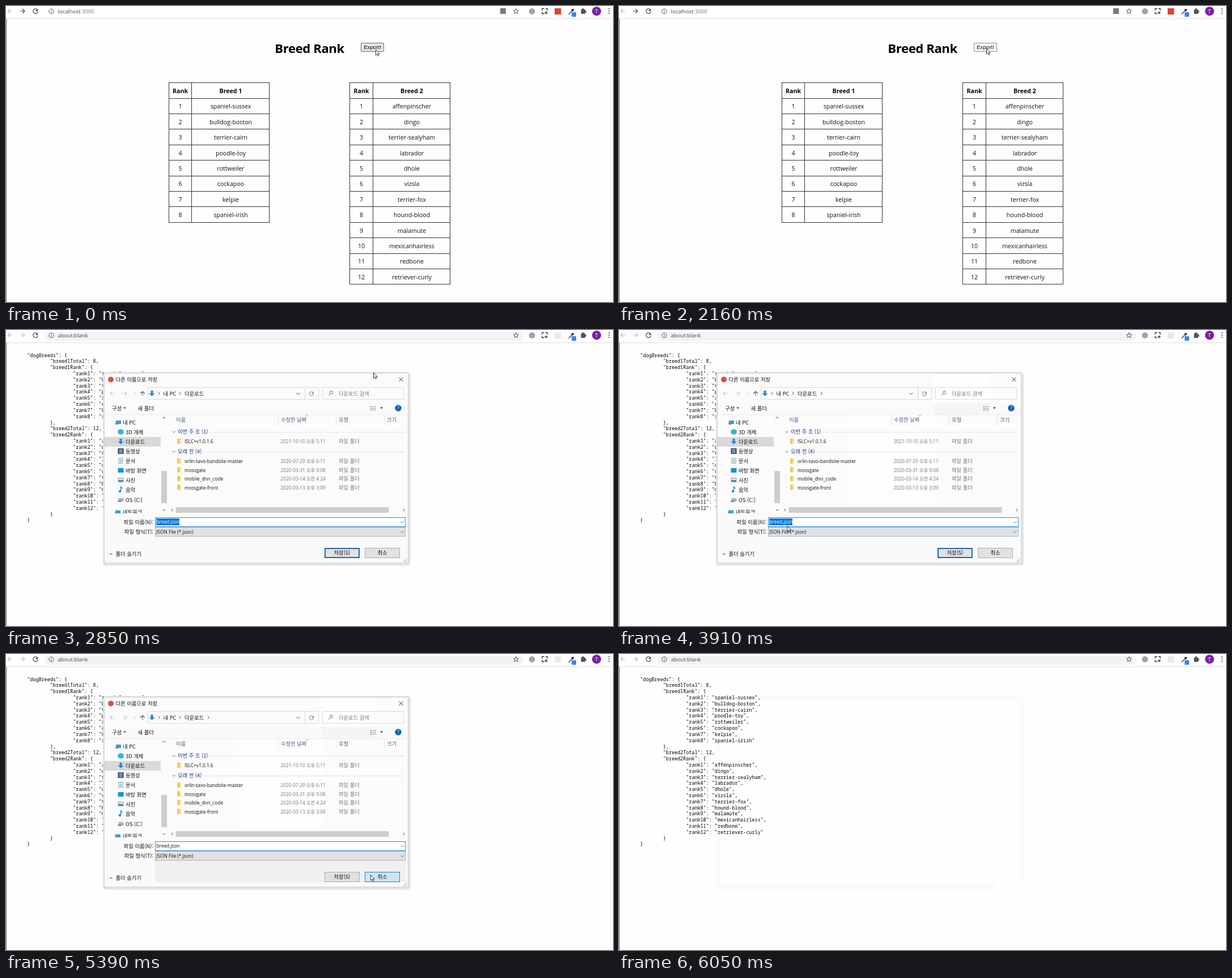
Animation, 1071 px wide and 523 px high, one loop 6.33 s. Source, as an HTML page:

```html
<!DOCTYPE html>
<html lang="ko">
<head>
<meta charset="utf-8">
<title>Breed Rank</title>
<style>
  html, body { margin: 0; width: 100%; height: 100%; overflow: hidden; background: #fefefe; }
  svg { display: block; width: 1071px; height: 523px; }
  text { font: 10.62px "Open Sans", "Noto Sans", sans-serif; fill: #111; white-space: pre; }
  .mid { text-anchor: middle; }
  .end { text-anchor: end; }
  .bold { font-weight: 700; fill: #000; }
  text.title { font-size: 22.2px; letter-spacing: -.45px; }
  text.url { font-size: 9.5px; fill: #444; }
  text.button { font: 9.7px "Liberation Sans", Arial, sans-serif; fill: #111; }
  text.code { font: 8.43px "Noto Sans Mono", "DejaVu Sans Mono", monospace; fill: #000; }
  text.ko { font: 9.3px "Noto Sans CJK KR", "Noto Sans CJK JP", sans-serif; }
  text.file { font: 8.3px "Open Sans", "Noto Sans CJK KR", "Noto Sans CJK JP", sans-serif; }
  text.soft { fill: #777; }
  text.head { fill: #4c607a; }
  text.group { fill: #1e3287; }
  text.white { fill: #fff; }
</style>
</head>
<body>
<svg id="stage" viewBox="0 0 1071 523" xmlns="http://www.w3.org/2000/svg"></svg>
<script>
const LOOP = 6330;
const stage = document.getElementById('stage');

// Drawing helpers
const text = (x, y, value, cls = '') => `<text x="${x}" y="${y}" class="${cls}">${value}</text>`;
const rect = (x, y, w, h, fill, extra = '') =>
  `<rect x="${x}" y="${y}" width="${w}" height="${h}" fill="${fill}" ${extra}/>`;
const box = (x, y, w, h, fill, stroke, extra = '') =>
  rect(x + .5, y + .5, w - 1, h - 1, fill, `stroke="${stroke}" ${extra}`);
const line = (d, color = '#444', width = 1) =>
  `<path d="${d}" fill="none" stroke="${color}" stroke-width="${width}"/>`;
const shape = (d, fill) => `<path d="${d}" fill="${fill}"/>`;
const dot = (x, y, r, fill) => `<circle cx="${x}" cy="${y}" r="${r}" fill="${fill}"/>`;
const chevron = (x, y, dir, color = '#444', s = 2.6) => line({
  down: `M${x - s} ${y - s / 2}l${s} ${s} ${s} ${-s}`,
  up: `M${x - s} ${y + s / 2}l${s} ${-s} ${s} ${s}`,
  left: `M${x + s / 2} ${y - s}l${-s} ${s} ${s} ${s}`,
  right: `M${x - s / 2} ${y - s}l${s} ${s} ${-s} ${s}`,
}[dir], color);
const arrow = (x, y, dir, color, s = 4) =>
  `<g transform="translate(${x} ${y}) rotate(${dir})">${line(`M${-s} 0H${s}M0 ${-s}L${s} 0L0 ${s}`, color, 1.1)}</g>`;
const reload = (x, y, r, color = '#444', width = 1.2) =>
  line(`M${x + r * .75} ${y - r * .65}A${r} ${r} 0 1 0 ${x + r} ${y + r * .2}`, color, width) +
  shape(`M${x + r} ${y - r}v${r}h${-r}z`, color);
// "on" lists the spans in ms in which a group is visible
const during = (on, content, extra = '') => `<g data-on="${on}" ${extra}>${content}</g>`;

const breeds1 = 'spaniel-sussex bulldog-boston terrier-cairn poodle-toy rottweiler cockapoo kelpie spaniel-irish'.split(' ');
const breeds2 = ('affenpinscher dingo terrier-sealyham labrador dhole vizsla terrier-fox hound-blood ' +
  'malamute mexicanhairless redbone retriever-curly').split(' ');

const browserBar = () => {
  const star = Array.from({ length: 10 }, (_, i) => {
    const r = i % 2 ? 2.1 : 4.8, a = Math.PI * (i / 5 - .5);
    return `${(900 + r * Math.cos(a)).toFixed(1)} ${(9.5 + r * Math.sin(a)).toFixed(1)}`;
  }).join('L');
  return rect(0, 0, 1071, 22, '#fff') +
    during('2310-6330', rect(68, 3, 845, 16, '#f1f3f4', 'rx="8"')) +
    rect(0, 22, 1071, 1, '#dfe0e2') + rect(0, 22, 1, 501, '#6a6a6a') +
    arrow(7, 9, 180, '#bbb') +
    during('0-2310', arrow(29, 9, 0, '#444')) + during('2310-6330', arrow(29, 9, 0, '#bbb')) +
    reload(52, 9, 4.2) +
    `<circle cx="80" cy="9.5" r="4.2" fill="none" stroke="#555"/>` + rect(79.5, 9, 1, 3, '#555') + rect(79.5, 7, 1, 1, '#555') +
    during('0-2310', text(91.5, 13, 'localhost<tspan fill="#777">:3000</tspan>', 'url') +
      rect(872, 4, 10, 10, '#777b80') + rect(968, 4, 11.5, 11, '#cf4a35')) +
    during('2310-6330', text(91.5, 13, 'about:blank', 'url') + rect(968, 4, 11.5, 11, '#e9e9e9')) +
    line(`M${star}Z`, '#555') + dot(928, 9.5, 5.4, '#a3a3a3') +
    line('M946 8V4.500H949.500M952 4.500H955V8M946 10.500V13.500H949.500', '#333', 1.3) +
    line('M953 9.500v5M950.500 12h5', '#333', 1.3) +
    line('M993 14.500L999 8', '#555', 1.8) + line('M998 6l3 3M999.500 7.500l2-2', '#222', 2.2) +
    rect(998, 11, 8, 8, '#3f83ee', 'rx="1"') +
    rect(1014.5, 6, 7.5, 8, '#555', 'rx="1"') + dot(1018, 5.6, 1.7, '#555') + dot(1022.4, 10, 1.7, '#555') +
    dot(1042, 9.2, 8, '#7b1fa2') + text(1042, 12.5, 'T', 'url mid white') +
    [5, 9, 13].map(y => dot(1064, y, 1.1, '#444')).join('');
};

const rankTable = (x, split, width, name, breeds) => {
  const rows = ['Rank', ...breeds], pitch = 27.4;
  const rowTop = i => Math.floor(135.7 + pitch * i);
  const bottom = rowTop(rows.length);
  return box(x, 135, width, bottom - 134, '#fefefe', '#333') +
    line(`M${split + .5} 135V${bottom}`, '#333') +
    rows.map((breed, i) => {
      const y = 154 + pitch * i, cls = i ? 'mid' : 'mid bold';
      return (i ? line(`M${x} ${rowTop(i) + .5}H${x + width}`, '#333') : '') +
        text((x + split) / 2 + .5, y, i || breed, cls) +
        text((split + x + width) / 2 + .5, y, i ? breed : name, cls);
    }).join('');
};

const exportButton = () => {
  const face = (fill, border) => box(626, 65, 41, 16, fill, border, 'rx="1.5"');
  return during('250-550,1120-1540', face('#efefef', '#767676')) +
    during('0-250,550-1120,1540-2160', face('#e5e5e5', '#6a6a6a')) +
    during('2160-2310', face('#f5f5f5', '#8d8d8d')) +
    text(646.5, 76.3, 'Export!', 'button mid');
};

const rankPage = () =>
  text(535.6, 83, 'Breed Rank', 'title bold mid') + exportButton() +
  rankTable(287, 327, 178, 'Breed 1', breeds1) +
  rankTable(606, 647, 178, 'Breed 2', breeds2);

const jsonPage = () => {
  const ranks = list => list.map((b, i) => [2, `"rank${i + 1}": "${b}"${i < list.length - 1 ? ',' : ''}`]);
  return [
    [0, '"dogBreeds": {'],
    [1, '"breed1Total": 8,'], [1, '"breed1Rank": {'], ...ranks(breeds1), [1, '},'],
    [1, '"breed2Total": 12,'], [1, '"breed2Rank": {'], ...ranks(breeds2), [1, '}'],
    [0, '}'],
  ].map(([tab, s], i) => text(37.3 + tab * 40.5, (47.6 + i * 10.81).toFixed(2), s, 'code')).join('');
};

const downArrow = (x, y) => shape(`M${x - 2} ${y - 5}h4v5h3l-5 5l-5-5h3z`, '#2b88d8');
const folder = (x, y) => rect(x - 3, y - 4.5, 6, 9, '#f7d774') + rect(x - 3, y - 4.5, 2, 9, '#e9b94a');
const drive = (x, y, color) => rect(x - 4, y - 3, 9, 6, color) + rect(x - 5, y + 1, 6, 3, '#7e8a94');

const sidebar = () => {
  const screen = (x, y) => rect(x - 5, y - 4, 10, 8, '#1593e0');
  const items = [
    [163, '내 PC', (x, y) => drive(x, y, '#3f9ad6'), 198],
    [180, '3D 개체', (x, y) => shape(`M${x} ${y - 5}l5 2v6l-5 2-5-2v-6z`, '#33b5cf')],
    [197, '다운로드', downArrow],
    [214, '동영상', (x, y) => rect(x - 5, y - 5, 10, 10, '#3b3f55') + rect(x - 3, y - 4, 6, 8, '#6f8fc0')],
    [231, '문서', (x, y) => box(x - 4, y - 5, 8, 10, '#fff', '#8a9aa8') +
      line(`M${x - 2} ${y - 2}h4m-4 2h4m-4 2h4`, '#5b9bd5')],
    [248, '바탕 화면', screen],
    [265, '사진', (x, y) => box(x - 5, y - 4, 10, 8, '#dcebf5', '#8a9aa8') + rect(x - 4, y, 8, 3, '#4c87a8')],
    [282, '음악', (x, y) => dot(x - 1.5, y + 3, 2.2, '#1e88e5') + line(`M${x} ${y + 3}v-8l3 3`, '#1e88e5', 1.4)],
    [300, 'OS (C:)', (x, y) => drive(x, y, '#a9b4bd')],
    [321.5, '네트워크', (x, y) => drive(x, y, '#3f9ad6'), 197],
  ];
  return rect(174, 189, 99, 17, '#d9d9d9') +
    `<svg x="0" y="0" width="273" height="324">` +
    items.map(([y, label, icon, x = 202.5]) => icon(x, y) + text(x < 200 ? 206 : 211, y + 3.5, label, 'ko')).join('') +
    '</svg>' +
    rect(274, 249, 10, 57, '#cdcdcd') + chevron(279, 155, 'up') + chevron(279, 318, 'down');
};

const fileList = () => {
  const heads = [[300, '이름'], [485, '수정한 날짜'], [587, '유형'], [672, '크기']];
  const groups = [[180, '이번 주 조 (1)', 358], [215, '오래 전 (4)', 347]];
  const files = [
    [197, 'ISLC+v1.0.1.6', '2021-10-10 오후 5:11'],
    [232, 'orlin-tavo-bandsite-master', '2020-07-29 오후 6:11'],
    [247.5, 'mossgate', '2020-03-31 오후 9:08'],
    [263, 'mobile_dnn_code', '2020-03-14 오전 4:24'],
    [278.5, 'mossgate-front', '2020-03-13 오후 3:09'],
  ];
  return heads.map(([x, s]) => text(x, 161.5, s, 'ko head')).join('') +
    line('M480.500 150v17M582.500 150v17M667.500 150v17', '#e5e5e5') + chevron(531, 151.5, 'down', '#888', 2) +
    groups.map(([y, s, x]) => chevron(296, y, 'down', '#667') + text(303, y + 3.4, s, 'ko group') +
      line(`M${x} ${y + .5}H704`, '#e2e2e2')).join('') +
    files.map(([y, name, date]) => folder(305.5, y - .5) + text(315, y + 3, name, 'file') +
      text(484.5, y + 3, date, 'file soft') + text(587, y + 3.2, '파일 폴더', 'ko soft')).join('') +
    chevron(293, 318, 'left') + chevron(702, 318, 'right') + rect(299.5, 313, 376, 10, '#cdcdcd');
};

const addressRow = () =>
  arrow(188, 112, 180, '#ccc') + arrow(209, 112, 0, '#ccc') + chevron(227, 112, 'down', '#bbb', 2) + arrow(241, 112.5, -90, '#555') +
  box(250, 101, 278, 22, 'none', '#d9d9d9') + box(527, 101, 25, 22, 'none', '#d9d9d9') +
  box(558, 101, 144, 22, 'none', '#d9d9d9') +
  downArrow(257.5, 112) + chevron(270, 112, 'right') + text(277.5, 115.5, '내 PC', 'ko') +
  chevron(307, 112, 'right') + text(315, 115.5, '다운로드', 'ko') +
  during('3100-5630', chevron(357, 112, 'right')) +
  chevron(515.5, 112.5, 'down', '#444', 3) + reload(539, 112.5, 3.6, '#777', 1) +
  `<circle cx="574" cy="110.5" r="2.7" fill="none" stroke="#777"/>` + line('M572 112.500l-3.500 3.500', '#777') +
  text(587, 115.5, '다운로드 검색', 'ko soft');

const toolRow = () =>
  text(187, 141.5, '구성', 'ko') + shape('M207 136.500h5l-2.500 3z', '#444') + text(232.5, 141.5, '새 폴더', 'ko') +
  [134.5, 137.5, 140.5].map(y => rect(643, y, 2, 2, '#8a9aa8') + rect(646, y + .5, 7, 1, '#999')).join('') +
  shape('M660 136.500h5l-2.500 3z', '#333') + dot(692, 138, 5.7, '#0f5fb5') + text(692, 141.2, '?', 'file mid bold white');

const dialogButton = (x, label, fill, border, width = 1) =>
  rect(x + width / 2, 385 + width / 2, 62 - width, 18 - width, fill, `stroke="${border}" stroke-width="${width}"`) +
  text(x + 31, 397.2, label, 'ko mid');

const fileFields = () => {
  const save = (...look) => dialogButton(562, '저장(S)', ...look);
  const cancel = (...look) => dialogButton(633, '취소', ...look);
  const plain = ['#e1e1e1', '#adadad'], hover = ['#e5f1fb', '#0078d7'];
  return during('4450-5630', rect(263, 365, 442, 38, '#f0f0f0')) +
    text(260, 342.5, '파일 이름(N):', 'ko end') + text(260, 360.3, '파일 형식(T):', 'ko end') +
    box(263, 331, 442, 17, '#fff', '#2b88d8') +
    during('2700-5020', rect(265, 333, 41, 12, '#0078d7') + text(265.5, 342.2, 'breed.json', 'file white')) +
    during('5020-5630', text(265.5, 342.2, 'breed.json', 'file')) +
    box(263, 348, 442, 17, ...plain) +
    during('3910-4450', box(263, 348, 442, 17, '#dde4e8', '#9db7c9')) +
    text(265.3, 360, 'JSON File (*.json)', 'file') +
    chevron(699, 339.5, 'down', '#666') + chevron(699, 357, 'down', '#666') +
    during('2700-4570,4870-5020', save('#e1e1e1', '#2168a8', 2)) +
    during('4570-4870', save('#e5f1fb', '#0078d7', 2)) +
    during('5020-5630', save(...plain)) +
    during('2700-4870', cancel(...plain)) +
    during('4870-5020', cancel(...hover)) +
    during('5020-5630', cancel('#cce4f7', '#2b7cbd')) +
    chevron(185, 396, 'up', '#333') + text(193.5, 399.2, '폴더 숨기기', 'ko') +
    [0, 1, 2].map(r => [0, 1, 2].slice(2 - r).map(c => rect(701 + c * 2.4, 403.5 + r * 2.4, 1.3, 1.3, '#999')).join('')).join('');
};

const saveDialog = () =>
  during('2850-5510', rect(171, 74, 543, 342.5, '#e3e3e3', 'rx="6"')) +
  box(173, 76, 537, 336, '#fafafa', '#d2d2d2') +
  rect(174, 77, 535, 52, '#fbfbfb') + rect(174, 149, 535, 175, '#fbfbfb') +
  during('3340-5630', rect(556, 77, 99, 52, '#fefefe') + rect(556, 129, 99, 20, '#f4f5f6') +
    rect(403, 150, 160, 174, '#fdfdfd')) +
  line('M174 149.500H709', '#ececec') +
  dot(185, 87.5, 5, '#d9503f') + text(193.5, 91, '다른 이름으로 저장', 'ko') +
  line('M693.500 84l7 7m0-7l-7 7', '#333') +
  addressRow() + toolRow() + sidebar() + fileList() + fileFields();

const ghost = shape('M168 72H717V403H704V82H178V404H664V418H168Z', '#fbfbfb');

// Pointer stops: time, x, y of the tip
const stops = [
  [0, 652, 77], [250, 626, 96], [400, 625, 94], [550, 635, 74], [700, 637, 73],
  [1120, 636, 105], [1270, 641, 94], [1390, 645.5, 80], [1540, 647, 77], [1660, 648, 75],
  [3100, 632, 92], [3220, 596, 122], [3340, 555, 153], [3490, 474, 246], [3610, 401, 321],
  [3760, 301, 321], [3910, 296.5, 346], [4180, 303, 352], [4300, 335, 360],
  [4450, 450, 376], [4570, 567, 388], [4720, 606, 390], [4870, 643, 390],
  [5510, 700, 412], [5630, 840, 458], [5750, 971, 495], [5900, 861, 407],
];

stage.innerHTML = rect(0, 0, 1071, 523, '#fefefe') + browserBar() +
  during('0-2310', rankPage()) +
  during('5510-6330', ghost) +
  during('2310-6330', jsonPage()) +
  during('2700-5630', saveDialog(), 'id="dialog"') +
  during('0-6050', '<g id="pointer">' +
    during('0-3610,3910-6050', '<path d="M.5 .5V10L2.700 8 4.300 11.500 5.800 10.800 4.300 7.500H7.300Z" fill="#fff" stroke="#222" stroke-width=".9"/>') +
    during('3610-3910', line('M-2 .5h4M0 .5v16M-2 16.500h4', '#222')) + '</g>');

const dialog = document.getElementById('dialog');
const pointer = document.getElementById('pointer');
const timed = [...stage.querySelectorAll('[data-on]')].map(node => ({
  node, spans: node.dataset.on.split(',').map(span => span.split('-').map(Number)),
}));

const start = performance.now();
function draw() {
  const t = (performance.now() - start) % LOOP;
  for (const { node, spans } of timed) {
    node.style.display = spans.some(([from, to]) => t >= from && t < to) ? '' : 'none';
  }
  dialog.style.opacity = t < 2850 ? .8 : t < 5510 ? 1 : .35;
  const [, x, y] = stops.filter(stop => stop[0] <= t).pop();
  pointer.setAttribute('transform', `translate(${x} ${y})`);
  requestAnimationFrame(draw);
}
draw();
</script>
</body>
</html>
```
